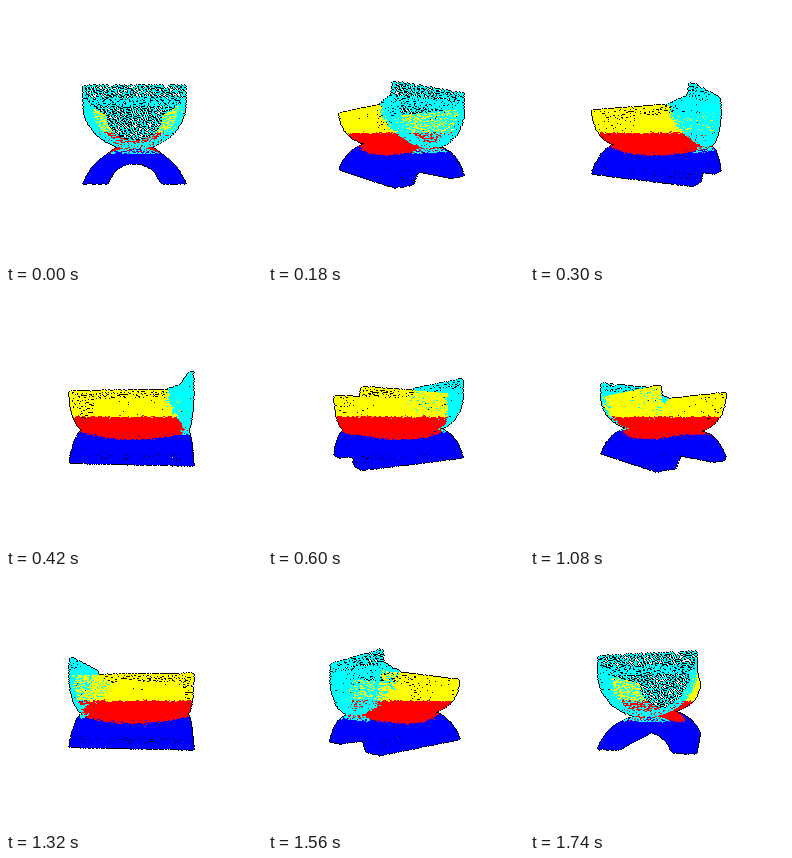
These frames come from a looping animation (256x256 px, 1800 ms). A matplotlib script:

```python
import numpy as np
import matplotlib.pyplot as plt
from matplotlib.animation import FuncAnimation

SIZE, FRAMES, LOOP = 256, 30, 1800
EYE = 219                      # camera distance
A, B, H = 38.7, 51, 37.6       # half width, depth, height
ARM, SEAT_RY = -23, 34         # arm top and depth of the seat bowl

CYAN, YELLOW, RED, BLUE = (0, 255, 255), (255, 255, 0), (255, 0, 0), (0, 0, 255)
rng = np.random.default_rng(4)


def spread(area, density):
    """Evenly spread pairs in the unit square."""
    n = int(area * density)
    i = np.arange(n)[:, None]
    uv = rng.random(2) + i * np.array([0.7548777, 0.5698403])
    return ((uv + rng.normal(0, 0.3 / np.sqrt(n), (n, 2))) % 1).T


def between(t, lo, hi):
    return lo + (hi - lo) * t


def bowl_floor(x):
    return ARM + SEAT_RY * np.sqrt(np.clip(1 - (x / A) ** 2, 0, 1))


def arc_height(x, r, cy):
    return cy - np.sqrt(np.clip(r * r - x * x, 0, None))


def rim(z, width, density):
    u, v = spread(115 * width, density)
    th, k = u * np.pi, width * v
    return (A - k) * np.cos(th), ARM + (SEAT_RY - k) * np.sin(th), 0 * u + z


def paint(color, n):
    return np.tile(np.array(color, float), (n, 1))


def seat():
    parts = [rim(-B, 3, 0.8)]
    for t in (0, 3):
        u, v = spread(115 * 2 * B, 0.42)
        th, z = u * np.pi, between(v, -B, B)
        parts.append(((A - t) * np.cos(th), ARM + (SEAT_RY - t) * np.sin(th), z))
    for side in (-1, 1):
        u, v = spread(2 * B * 3, 0.6)
        parts.append((side * (A - 3 * u), 0 * u + ARM, between(v, -B, B)))
    x, y, z = np.hstack(parts)
    c = paint(YELLOW, x.size)
    c[y + rng.normal(0, 0.6, x.size) > -1.5] = RED
    edge = 32 + 15 * ((y - ARM) / 31) ** 2
    cyan = z + rng.normal(0, 1.2, x.size) > edge
    mixed = (x > 8) & (y < 2) & (z < 48) & (rng.random(x.size) < 0.65)
    c[cyan & ~mixed] = CYAN
    return np.array([x, y, z]), c


def back():
    # outer plate
    u, v = spread(2 * A * (H + 11), 0.25)
    x, y = between(u, -A, A), between(v, -H, 11)
    keep = y < bowl_floor(x)
    parts = [(x[keep], y[keep], 0 * x[keep] + B), rim(B, 4, 0.7)]
    # lip, ledge and sloped cushion
    corners = [(B, -H), (49, -H), (47, -29), (43, -27.5), (32, -24), (47, 8)]
    densities = [0.3, 0.15, 0.4, 0.3, 0.13]
    for (z0, y0), (z1, y1), d in zip(corners, corners[1:], densities):
        u, v = spread(2 * A * np.hypot(z1 - z0, y1 - y0), d)
        x, y, z = between(u, -A, A), between(v, y0, y1), between(v, z0, z1)
        keep = y < np.maximum(bowl_floor(x), ARM - 0.5)
        parts.append((x[keep], y[keep], z[keep]))
    # closed sides above the arms
    for side in (-1, 1):
        u, v = spread(19 * 15, 0.7)
        z, y = between(u, 32, B), between(v, -H, ARM)
        top = np.interp(z, [32, 43, 47, 49, B], [-24, -27.5, -29, -H, -H])
        keep = y > top
        parts.append((0 * z[keep] + side * A, y[keep], z[keep]))
    p = np.hstack(parts)
    return p, paint(CYAN, p.shape[1])


def base():
    parts = []
    for half, r, cy, d in ((A, 41.2, 51.8, 0.8), (21.5, 22.6, 44.6, 0.6)):
        lim = np.arcsin(half / r)
        u, v = spread(2 * lim * r * 2 * B, d)
        th = between(u, -lim, lim)
        parts.append((r * np.sin(th), cy - r * np.cos(th), between(v, -B, B)))
    for z in (-B, B):
        u, v = spread(2 * A * 27, 0.9)
        x, y = between(u, -A, A), between(v, 10.6, H)
        inner = np.where(abs(x) < 21.5, arc_height(x, 22.6, 44.6), H)
        keep = (y > arc_height(x, 41.2, 51.8)) & (y < inner)
        parts.append((x[keep], y[keep], 0 * x[keep] + z))
    for side in (-1, 1):
        u, v = spread(17 * 2 * B, 0.5)
        parts.append((side * between(u, 21.5, A), 0 * u + H, between(v, -B, B)))
    x, y, z = np.hstack(parts)
    c = paint(BLUE, x.size)
    limit = 13 + 6 * np.cos(z / B * np.pi / 2) + rng.normal(0, 0.5, x.size)
    c[y < limit] = RED
    c[(z > 44) & (y < 15) & (rng.random(x.size) < 0.6)] = CYAN
    return np.array([x, y, z]), c


clouds = [seat(), back(), base()]
PTS = np.hstack([p for p, _ in clouds])
COLORS = np.vstack([c for _, c in clouds]).astype(np.uint8)

DOT = [(0, 0), (1, 0)]
EDGE = [(-1, 0), (0, 1), (1, -1), (2, 0)]


def render(i):
    a = 2 * np.pi * i / FRAMES
    x, y, z = PTS
    depth = z * np.cos(a) - x * np.sin(a)
    s = EYE / (EYE - depth)
    px = np.rint(127.5 + s * (x * np.cos(a) + z * np.sin(a))).astype(int)
    py = np.rint(128 + s * y).astype(int)
    order = np.argsort(depth)
    px, py, col = px[order], py[order], COLORS[order]
    img = np.full((SIZE, SIZE, 3), 255, np.uint8)
    for dx, dy in EDGE:
        img[py + dy, px + dx] = 0
    # stamp the dots of each point together, far to near
    ys = np.stack([py + dy for _, dy in DOT], 1).ravel()
    xs = np.stack([px + dx for dx, _ in DOT], 1).ravel()
    img[ys, xs] = np.repeat(col, len(DOT), axis=0)
    return img


fig = plt.figure(figsize=(2.56, 2.56), dpi=100, facecolor="white")
ax = fig.add_axes([0, 0, 1, 1])
ax.axis("off")
view = ax.imshow(render(0), interpolation="nearest", aspect="auto")


def update(i):
    view.set_data(render(i))
    return [view]


anim = FuncAnimation(fig, update, frames=FRAMES, interval=LOOP / FRAMES,
                     repeat=True, repeat_delay=0, blit=False)
plt.show()
```
